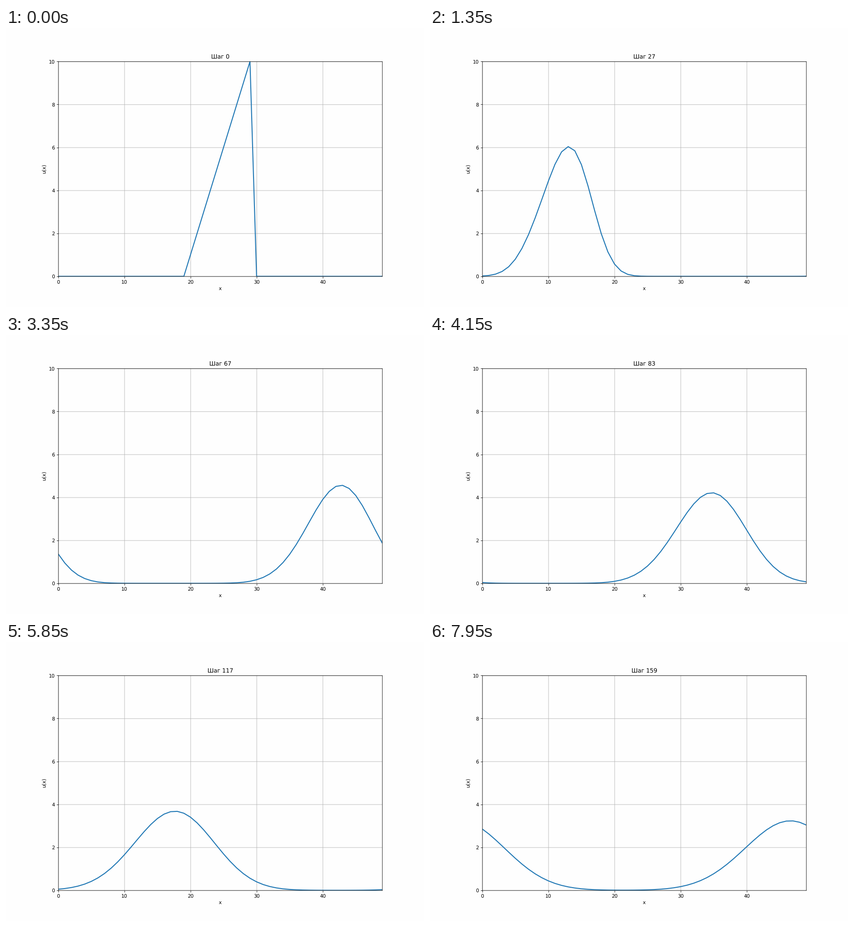
A matplotlib script that plays this animation: 917 px wide and 611 px high, repeating every 8 s.

```python
import numpy as np
import matplotlib.pyplot as plt
from matplotlib.animation import FuncAnimation
from matplotlib.transforms import Affine2D

WIDTH, HEIGHT = 917, 611
DPI = WIDTH / 12
PAPER = "#fefefe"

CELLS = 50
STEPS = 160
COURANT = 0.5


def initial_profile():
    u = np.zeros(CELLS)
    u[19:30] = np.arange(11)
    return u


def advect(u):
    """One upwind step of leftward transport on a periodic grid."""
    return u + COURANT * (np.roll(u, -1) - u)


history = [initial_profile()]
for _ in range(STEPS - 1):
    history.append(advect(history[-1]))

# Smooth subpixel rendering: no glyph hinting, no snapping to whole pixels.
plt.rcParams.update({
    "font.family": "DejaVu Sans",
    "text.hinting": "no_hinting",
    "path.snap": False,
})

# The tiny margin keeps the pixel size from being truncated.
fig, ax = plt.subplots(
    figsize=((WIDTH + 1e-6) / DPI, (HEIGHT + 1e-6) / DPI),
    dpi=DPI,
    facecolor=PAPER,
)
ax.set_facecolor(PAPER)
ax.set_xlim(0, CELLS - 1)
ax.set_ylim(0, 10)
ax.set_xlabel("x")
ax.set_ylabel("u(x)")
ax.grid(True)

line, = ax.plot(np.arange(CELLS), history[0], lw=2, color="#1f77b4")
title = ax.set_title("Шаг 0")

# Frame and grid sit a fraction of a pixel right of and below the data.
nudge = Affine2D().translate(0.38, -0.38)
for rule in ax.get_xgridlines() + ax.get_ygridlines():
    rule.set_transform(rule.get_transform() + nudge)
for spine in ax.spines.values():
    spine.set_transform(spine.get_spine_transform() + nudge)


def update(step):
    line.set_ydata(history[step])
    title.set_text(f"Шаг {step}")
    return line, title


anim = FuncAnimation(fig, update, frames=STEPS, interval=50,
                     repeat=True, repeat_delay=0, blit=False)
plt.show()
```
